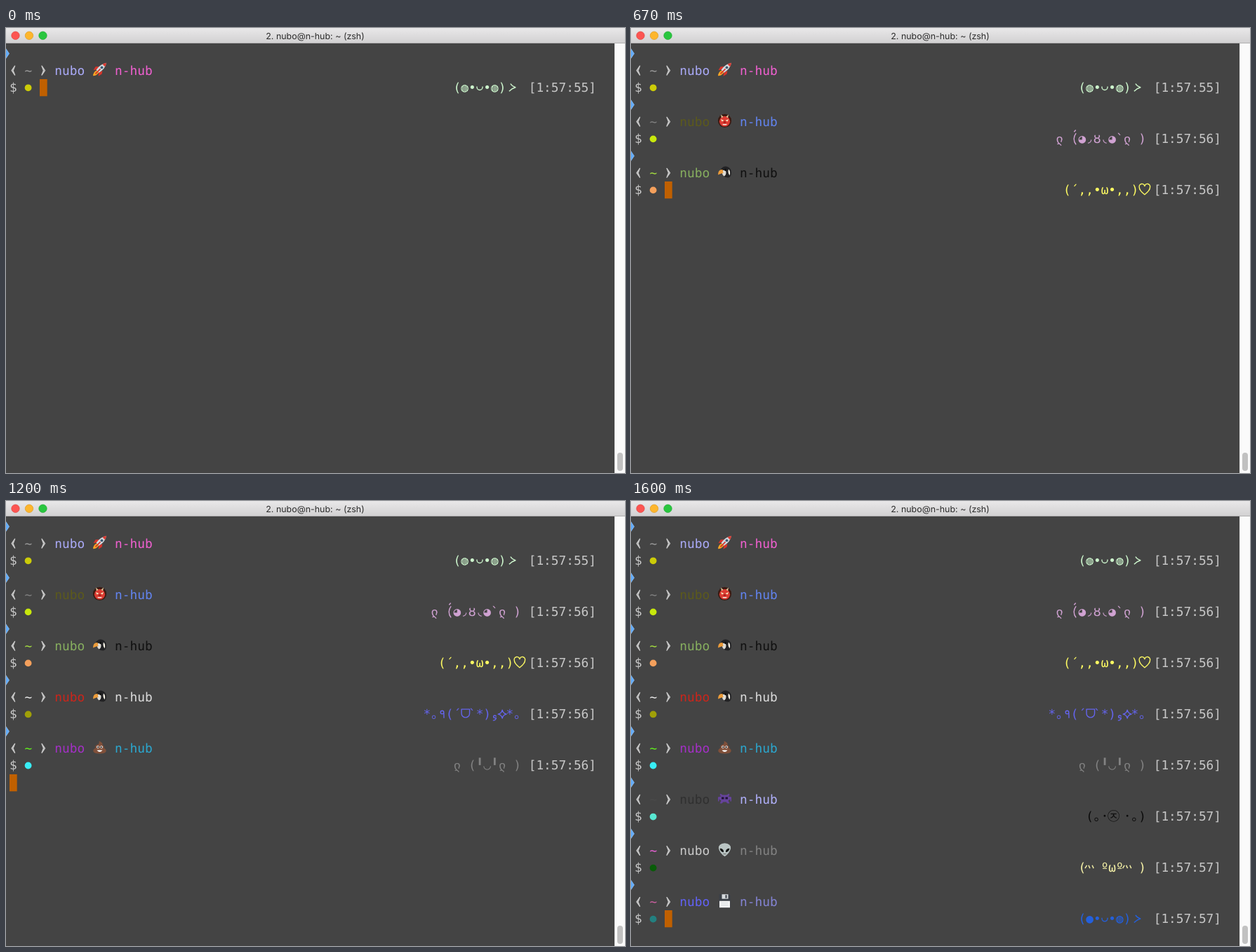
An HTML page for the animation above (1.67 s loop, 882 by 635 pixels).

```html
<!DOCTYPE html>
<html lang="en">
<head>
<meta charset="utf-8">
<title>Terminal prompt</title>
<style>
  html, body { margin: 0; width: 100%; height: 100%; overflow: hidden; background: #444; }
  svg { display: block; }
  text { text-rendering: geometricPrecision; white-space: pre; }
  #screen text { font: 17.8px "DejaVu Sans Mono", "DejaVu Sans", "Noto Sans CJK JP", "Noto Sans CJK", monospace; }
  .title { font: 12.45px Inter, sans-serif; fill: #2c2c2c; text-anchor: middle; }
  .glyph { text-anchor: middle; }
  .line { fill: none; stroke-width: 1.4; stroke-linejoin: round; }
</style>
</head>
<body>
<svg width="882" height="635" viewBox="0 0 882 635">
  <defs>
    <linearGradient id="bar" x2="0" y2="1">
      <stop stop-color="#e9e8e9"/><stop offset="1" stop-color="#d1d0d1"/>
    </linearGradient>
  </defs>
  <rect width="882" height="635" fill="#444"/>
  <g id="screen"></g>
  <rect x="867" y="22" width="15" height="613" fill="#fafafa"/>
  <rect x="867" y="22" width="1" height="613" fill="#e9e9e9"/>
  <rect x="871" y="606" width="8" height="26" rx="4" fill="#c1c1c1"/>
  <rect width="882" height="22" fill="url(#bar)"/>
  <rect y="21" width="882" height="1" fill="#b0afb0"/>
  <g stroke-width=".7">
    <circle cx="13.5" cy="10.8" r="5.7" fill="#fc5552" stroke="#e0443f"/>
    <circle cx="33" cy="10.8" r="5.7" fill="#fdb62d" stroke="#dd9b23"/>
    <circle cx="52.5" cy="10.8" r="5.7" fill="#29c63f" stroke="#1fab30"/>
  </g>
  <text class="title" x="440.5" y="15.5">2. nubo@n-hub: ~ (zsh)</text>
</svg>
<script>
const LOOP = 1670, LEFT = 5, TOP = 24.3, CELL = 10.72, ROW = 24.35, BASE = 18;
const GRAY = '#c7c7c7';
const screen = document.getElementById('screen');

const colX = c => LEFT + c * CELL;
const rowY = r => TOP + r * ROW;

// Symbols drawn around the cell centre, y = 0 on the baseline
const shapes = {
  '❮': 'M2.2-12.4L-2.2-6L2.2.4L-.3-6Z',
  '❯': 'M-2.2-12.4L2.2-6L-2.2.4L.3-6Z',
  '(\u0301': 'M2-14Q-4-5.8 2 2.4M-.8-15.8L1.6-18.6',
  'ᴗ': 'M-4-7.5v1a4 4 0 0 0 8 0v-1',
  'ゝ': 'M1-11.5Q3-8 8-6.3Q3-5-1-.8',
  '♡': 'M3.3.6Q-4.4-5-4.4-10A3.9 3.9 0 0 1 3.3-11.5A3.9 3.9 0 0 1 11-10Q11-5 3.3.6Z',
  'ᗜ': 'M-4.5-13H7V-7a5.7 5.7 0 0 1-11.5 0Z',
  '٩': 'M2.4-8.6a2.3 2.3 0 1 1-4.6 0a2.3 2.3 0 0 1 4.6 0Q2.6-4 2.6-.5',
  'و': 'M1.8-2.4a1.8 1.8 0 1 0-1.8 1.8h1.9Q1.8 2.8-2.6 3',
  '✧': 'M0-12Q1-7 6-6Q1-5 0 0Q-1-5-6-6Q-1-7 0-12Z',
  '灬': 'M-6.6-5.2l2.6-4.3M-1.6-9.5l2 4.3M3.6-9.5l2 4.3'
};

const emoji = {
  rocket: `<path d="M-4 1Q-9 3-9.5 9Q-4 9-1 4Z" fill="#f7a425"/>
    <path d="M-1-4.5L-6-4L-9 1L-4 0ZM4 2L3 6.5L-2 9.5L-1 4Z" fill="#d4342b"/>
    <path d="M9.5-9.5Q1-8-5 .5L-1 4.5Q8-1 9.5-9.5Z" fill="#d3d9de"/>
    <path d="M9.5-9.5Q6-9 4-7.5L7.5-4Q9-6 9.5-9.5Z" fill="#dc3a30"/>
    <path d="M1-1L-6 6" stroke="#d4342b" stroke-width="1.6"/>
    <circle cx="3" cy="-3" r="1.9" fill="#3c5a70"/>`,
  ogre: `<circle r="9.6" fill="#3a1a12"/><ellipse cy=".8" rx="7.6" ry="7.4" fill="#dc3b32"/>
    <path d="M-4.5-4L-5.5-9L-2-6ZM4.5-4L5.5-9L2-6Z" fill="#dcc59a"/>
    <path d="M-5.5-2.5L-1-.5L-4 1ZM5.5-2.5L1-.5L4 1Z" fill="#f5e6c0"/>
    <ellipse cy="2" rx="1.8" ry="1.2" fill="#9e1d19"/><path d="M-3.5 4.5H3.5L2 6H-2Z" fill="#f4eee4"/>`,
  penguin: `<path d="M-6-3Q-3-8.5 2-8Q9-7 9.5 1Q9.5 7 5 8Q-4 8-6-3Z" fill="#222224"/>
    <path d="M-3-2Q1-4 2 0Q2 5-1 6Q-5 3-3-2Z" fill="#dedcd6"/>
    <path d="M5.5-4Q9-1 7 5Q4 1 5.5-4Z" fill="#f4f0e4"/>
    <path d="M-3-3.5Q-9.5-4-9.5 4Q-6 2-2 1.5Z" fill="#ec9c3a"/><circle cx="1" cy="-3" r="1.6" fill="#111"/>`,
  poop: `<path d="M-1-9Q5-7 4-3Q7-2 6 1Q10 3 9 6Q8 9 0 9Q-8 9-9 6Q-10 3-6 1Q-7-3-3-4Q0-5-1-9Z" fill="#80503a"/>
    <circle cx="-2.5" cy="-.5" r="1.9" fill="#fff"/><circle cx="2.5" cy="-.5" r="1.9" fill="#fff"/>
    <circle cx="-2.3" cy="-.3" r="1"/><circle cx="2.3" cy="-.3" r="1"/>
    <path d="M-4 4H4Q2 6.5 0 6.5T-4 4Z" fill="#fff"/>`,
  monster: `<path d="M-6-7L-3-5H3L6-7L7-5L5-3L9.5-2V4H8V1L5 3L7 7H4L2 5H-2L-4 7H-7L-5 3L-8 1V4H-9.5V-2L-5-3L-7-5Z" fill="#66439c"/>
    <path d="M-4.5-2h3.5v3h-3.5ZM1-2h3.5v3h-3.5Z" fill="#211433"/>`,
  alien: `<path d="M0-9.5Q9-9 8.6-2Q7 5 0 9.5Q-7 5-8.6-2Q-9-9 0-9.5Z" fill="#b9c4c3"/>
    <path d="M-7-2Q-1-2-1.5 3.5Q-6 3-7-2ZM7-2Q1-2 1.5 3.5Q6 3 7-2Z" fill="#151717"/>
    <path d="M-2 6H2" stroke="#555" stroke-width=".9"/>`,
  floppy: `<path d="M-8-9.5H6L8-7.5V9.5H-8Z" fill="#3a3f46"/><path d="M-4-9.5H5V-3H-4Z" fill="#d6dadd"/>
    <path d="M1-8.5H3V-4H1Z" fill="#363b42"/><path d="M-7.5 0H7.5V9.5H-7.5Z" fill="#f5f5f5"/>
    <path d="M-5 3H5M-5 6H5" stroke="#c8ced4" stroke-width=".8"/>`
};

// [start ms, second, icon, ~ colour, user colour, host colour, mark colour, face colour, face column, face]
const prompts = [
  [0, 55, 'rocket', '#9c9c9c', '#aaaaf8', '#f060d0', '#cccc08', '#ccf5cc', 59, '(◍•ᴗ•◍)ゝ'],
  [200, 56, 'ogre', '#828282', '#5c5a1c', '#6284f0', '#c8e80c', '#d0a2d2', 56, 'ლ (\u0301◕◞ȣ◟◕`ლ )'],
  [670, 56, 'penguin', '#a6e040', '#87af5f', '#101010', '#f4a05c', '#fdfa62', 57, '(´,,•ω•,,)♡'],
  [870, 56, 'penguin', '#eeeeee', '#cb251b', '#dcdcdc', '#a0a008', '#6464ec', 55, '*｡٩(´ᗜ`*)و✧*｡'],
  [1070, 56, 'poop', '#62f31c', '#a430c6', '#2ba7cf', '#38eef6', '#828282', 59, 'ლ (╹◡╹ლ )'],
  [1270, 57, 'monster', '#4b4b4b', '#303030', '#b0b0fa', '#58e8d2', '#0c0c0c', 60, '(｡･㉨ ･｡)'],
  [1470, 57, 'alien', '#ee62da', '#cacaca', '#828282', '#085c08', '#f8f4a8', 59, '(灬 ºωº灬 )'],
  [1600, 57, 'floppy', '#cf60a2', '#6262f6', '#8484d4', '#238080', '#2460dc', 59, '(●•ᴗ•◍)ゝ']
];
const returns = [70, 530, 730, 930, 1130, 1330, 1530];

function add(parent, name, attrs, body = '') {
  const node = document.createElementNS('http://www.w3.org/2000/svg', name);
  for (const key in attrs) node.setAttribute(key, attrs[key]);
  node.innerHTML = body;
  return parent.appendChild(node);
}

function write(parent, col, row, fill, str) {
  add(parent, 'text', { x: colX(col), y: rowY(row) + BASE, fill }, str);
}

// One glyph per cell, so fallback fonts keep to the grid
function writeCells(parent, col, row, color, str) {
  str.match(/.\u0301?/gu).forEach((ch, i) => {
    const x = colX(col + i + .5), y = rowY(row) + BASE;
    if (shapes[ch]) {
      add(parent, 'path', { class: 'line', d: shapes[ch], stroke: color, transform: `translate(${x} ${y})` });
    } else if (ch !== ' ') {
      add(parent, 'text', { class: 'glyph', x: ch === '㉨' ? x + 2 : x, y, fill: color }, ch);
    }
  });
}

function drawPrompt(p, i) {
  const [, sec, icon, tilde, user, host, mark, faceColor, faceCol, face] = p;
  const g = add(screen, 'g', {}), r = 3 * i, y = rowY(r);
  add(g, 'path', { d: `M-1 ${y + 4}L4.5 ${y + 12.2}L-1 ${y + 20.4}Z`, fill: '#62acfa', stroke: '#94c6fa', 'stroke-width': .8 });
  writeCells(g, 0, r + 1, GRAY, '❮   ❯');
  write(g, 2, r + 1, tilde, '~');
  write(g, 6, r + 1, user, 'nubo');
  add(g, 'g', { transform: `translate(133.5 ${rowY(r + 1) + 10.7})` }, emoji[icon]);
  write(g, 14, r + 1, host, 'n-hub');
  write(g, 0, r + 2, GRAY, '$');
  add(g, 'circle', { cx: 31.6, cy: rowY(r + 2) + 12.3, r: 4.9, fill: mark });
  writeCells(g, faceCol, r + 2, faceColor, face);
  write(g, 69, r + 2, GRAY, `[1:57:${sec}]`);
  return g;
}

function loop(node, frames) {
  const steps = frames.map(([ms, style]) => ({ ...style, offset: ms / LOOP, easing: 'step-end' }));
  steps.push({ ...frames[frames.length - 1][1], offset: 1 });
  node.animate(steps, { duration: LOOP, iterations: Infinity });
}

const at = (col, row) => ({ transform: `translate(${Math.round(colX(col))}px, ${Math.round(rowY(row))}px)` });
const cursor = add(screen, 'rect', { width: 10.7, height: 24.3, fill: '#c06000' });
const groups = prompts.map(drawPrompt);

groups.forEach((g, i) => {
  if (i) loop(g, [[0, { opacity: 0 }], [prompts[i][0], { opacity: 1 }]]);
});
loop(cursor, prompts.flatMap(([ms], i) => {
  const stops = [[ms, at(4, 3 * i + 2)]];
  if (i < returns.length) stops.push([returns[i], at(0, 3 * i + 3)]);
  return stops;
}));
</script>
</body>
</html>
```
